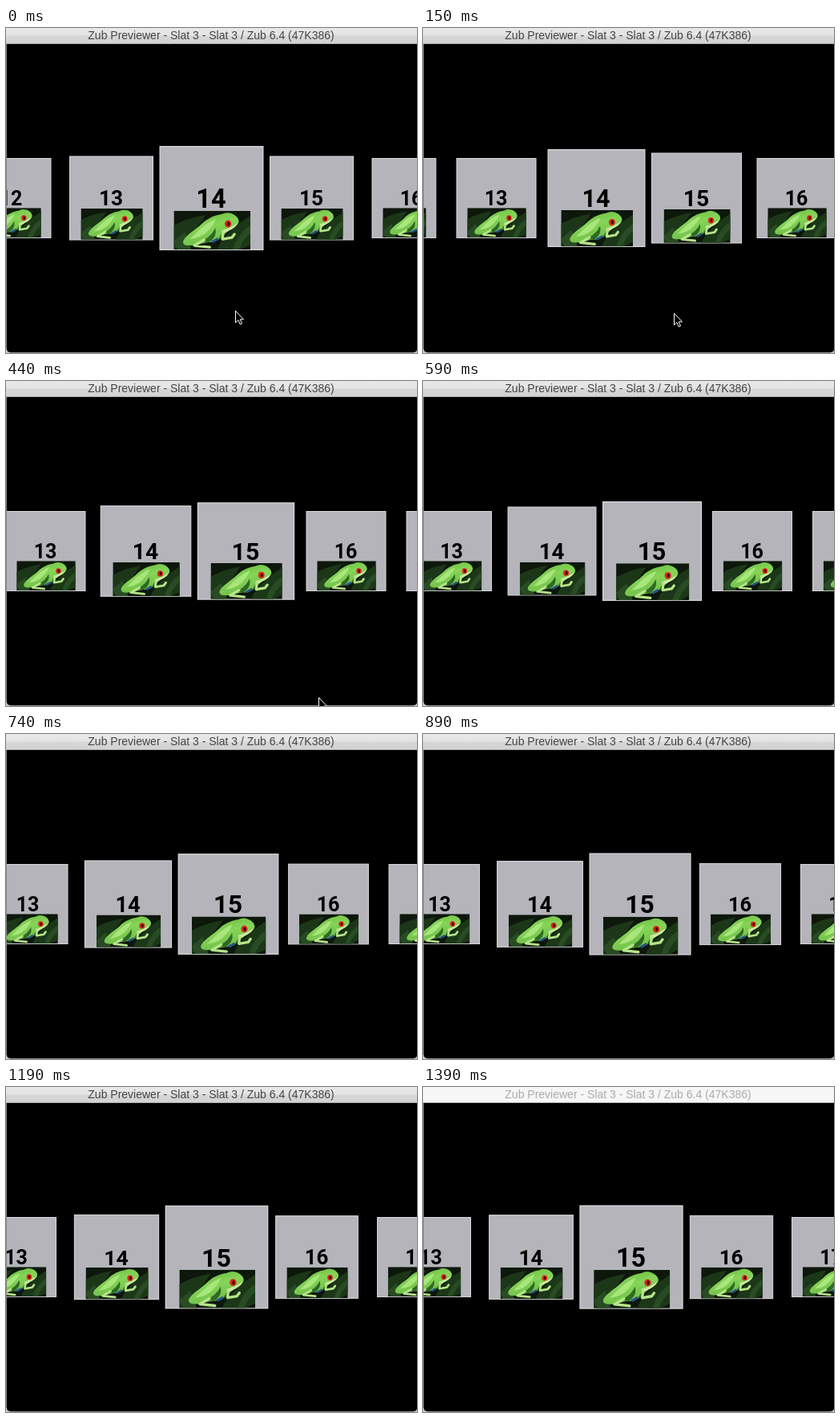
Recreate the animation shown at these times as an HTML page. Size 513 by 405 pixels, loop 1.49 s.

```html
<!DOCTYPE html>
<html lang="en">
<head>
<meta charset="utf-8">
<title>Card carousel</title>
<style>
  html, body { margin: 0; width: 100%; height: 100%; overflow: hidden; background: #d0d0d0; }
  svg { display: block; width: 513px; height: 405px; }
  #title { font: 14px "Liberation Sans", Arial, sans-serif; text-anchor: middle; fill: #444; }
  #bar { fill: url(#chrome); }
  .inactive #bar { fill: #f6f6f6; }
  .inactive #title { fill: #ababab; }
  .panel { fill: #b4b4ba; stroke: #d8d8db; }
  .number { font: 700 25px Roboto, "Open Sans", sans-serif; text-anchor: middle; fill: #000; }
</style>
</head>
<body>
<svg id="stage" viewBox="0 0 513 405">
  <defs>
    <linearGradient id="chrome" x2="0" y2="1">
      <stop offset="0" stop-color="#e8e8e8"/>
      <stop offset=".45" stop-color="#e4e4e4"/>
      <stop offset=".5" stop-color="#d7d7d7"/>
      <stop offset="1" stop-color="#d2d2d2"/>
    </linearGradient>
    <linearGradient id="skin" x2=".4" y2="1">
      <stop offset="0" stop-color="#63b83c"/>
      <stop offset=".5" stop-color="#86d458"/>
      <stop offset="1" stop-color="#6fbf48"/>
    </linearGradient>
    <clipPath id="screen"><path d="M1 20H513V400Q513 404 509 404H5Q1 404 1 400Z"/></clipPath>

    <symbol id="frog" viewBox="0 0 96 48" preserveAspectRatio="none">
      <path fill="#0d170b" d="M0 0H96V48H0Z"/>
      <path fill="#1b3718" d="M0 18Q18 8 40 5L22 30L0 48ZM54 48Q64 26 96 6V42L84 48Z"/>
      <path fill="#284b23" d="M0 38L14 26L22 48H4ZM74 48Q80 28 96 18V28Q86 36 82 48Z"/>
      <path fill="url(#skin)" d="M12 37C16 29 27 24 35 16C42 9 52 5 60 4Q66 1 72 3C78 5 83 10 81 15
        C78 20 71 23 66 27C60 33 55 38 46 39C38 38 32 43 20 43Q10 43 12 37Z"/>
      <path fill="#a8e67c" d="M20 35C29 27 39 15 53 10Q48 21 38 29Q31 34 20 35Z"/>
      <path fill="#2f6a25" d="M34 38Q47 32 52 21Q55 32 44 39ZM55 36L61 27L66 26L58 34Z"/>
      <path fill="#cfe9a6" d="M60 24Q70 22 80 15Q78 21 68 25L61 29Z"/>
      <path fill="#27558a" d="M46 38L55 33L56 36L49 40Z"/>
      <path fill="none" stroke="#b6e488" stroke-width="3.4" stroke-linecap="round" stroke-linejoin="round"
        d="M38 36L26 43L45 45M62 26L61 35L73 33L76 29"/>
      <ellipse cx="68" cy="16" rx="4.2" ry="4.4" fill="#dc2415"/>
      <ellipse cx="68.6" cy="16" rx="1.5" ry="2.6" fill="#2a0604"/>
    </symbol>
  </defs>

  <path fill="none" stroke="#858585" d="M.5 20V400M5 404.5H509"/>
  <g clip-path="url(#screen)">
    <rect width="513" height="405"/>
    <g id="cards"></g>
  </g>
  <path id="cursor" fill="#000" stroke="#fff"
    d="M0 0V14.6L3.4 11.4L5.8 16.8L8 15.8L5.7 10.6H10Z"/>
  <rect id="bar" width="513" height="20"/>
  <rect y="19" width="513" height="1" fill="#b0b0b0"/>
  <text id="title" x="256" y="14">Zub Previewer - Slat 3 - Slat 3 / Zub 6.4 (47K386)</text>
</svg>

<script>
const LOOP = 1490, SPACING = 125, MID_X = 256.5, MID_Y = 212;
const FIRST = 12, LAST = 17;

// [start ms, centre x of card 14]: a drag, then a decelerating glide
const scroll = [
  [0, 256.5], [150, 216.5], [300, 191.5], [440, 174.5], [590, 161],
  [740, 152.5], [890, 146], [1040, 141.5], [1190, 138], [1390, 135]
];

// [start ms, x, y]; parked outside the stage once it leaves
const pointer = [[0, 286.5, 352.5], [150, 313.5, 355.5], [300, 390.5, 394.5], [590, 390.5, 450]];

const byId = id => document.getElementById(id);
const poseAt = (steps, t) => steps.filter(step => step[0] <= t).pop();

const cards = [];
for (let n = FIRST; n <= LAST; n++) {
  const card = document.createElementNS("http://www.w3.org/2000/svg", "g");
  card.innerHTML = `
    <rect class="panel" x="-49.5" y="-49.5" width="99" height="99"/>
    <text class="number" x="-.4" y="9">${n}</text>
    <use href="#frog" x="-36.2" y="12.3" width="73.5" height="37"/>`;
  byId("cards").append(card);
  cards.push({ n, card });
}

function draw(t) {
  const centre = poseAt(scroll, t)[1];
  for (const { n, card } of cards) {
    const x = centre + (n - 14) * SPACING;
    const scale = Math.max(1, 1.3 - Math.abs(x - MID_X) / 500);
    card.setAttribute("transform", `translate(${x} ${MID_Y}) scale(${scale})`);
  }
  const [, px, py] = poseAt(pointer, t);
  byId("cursor").setAttribute("transform", `translate(${px} ${py})`);
  byId("stage").classList.toggle("inactive", t >= 1390);
}

const start = performance.now();
function tick() {
  draw((performance.now() - start) % LOOP);
  requestAnimationFrame(tick);
}
tick();
</script>
</body>
</html>
```
